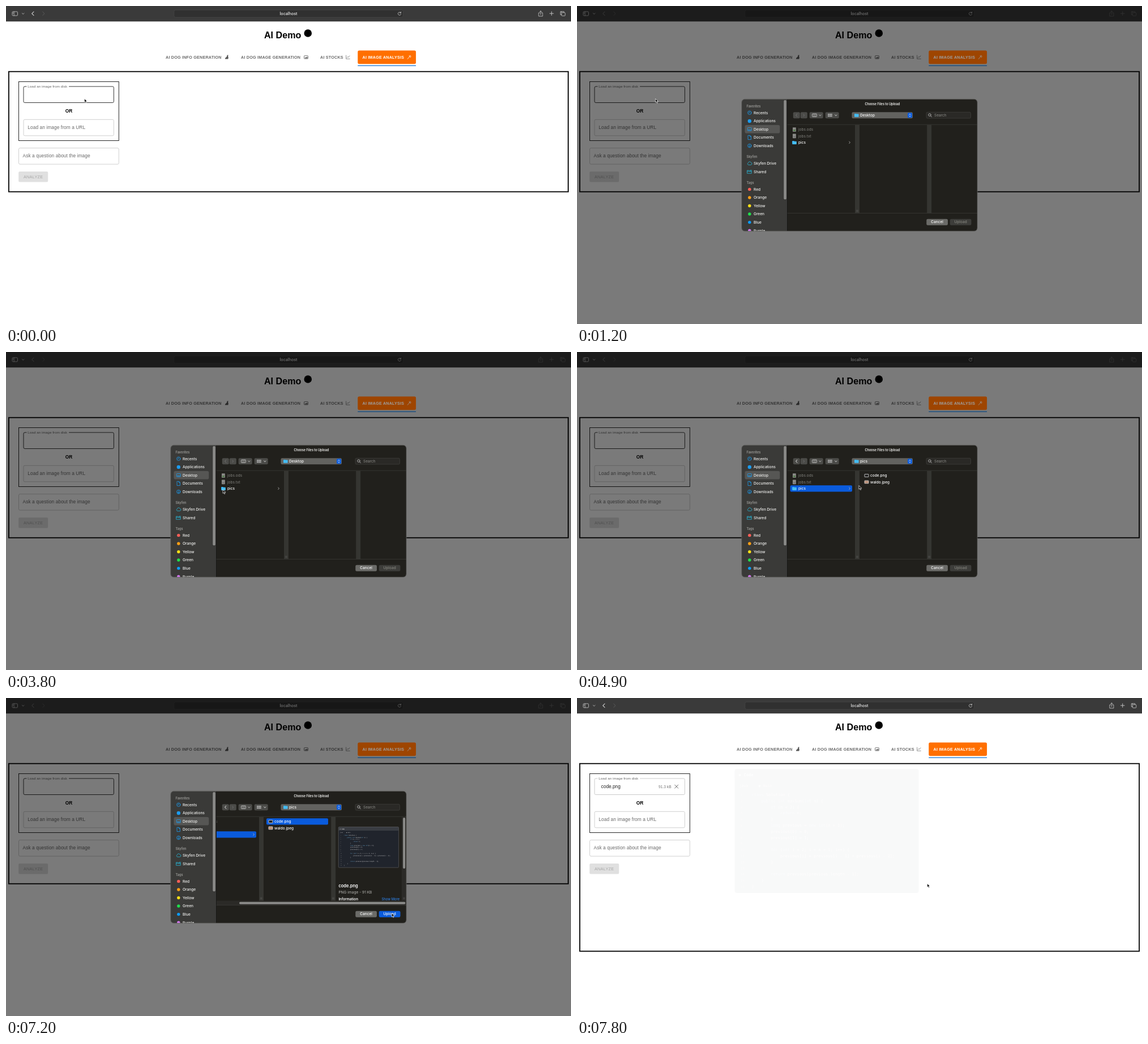
These frames come from a looping animation (998 px wide and 561 px high, 8 s). An HTML page:

```html
<!DOCTYPE html>
<html lang="en">
<head>
<meta charset="utf-8">
<title>AI Demo</title>
<style>
  html, body { margin: 0; width: 100%; height: 100%; overflow: hidden; background: #fff; }
  svg { display: block; width: 998px; height: 561px; }
  .page { font-family: "Liberation Sans", Arial, sans-serif; }
  .mac { font-family: Inter, sans-serif; }
  .mono { font-family: "DejaVu Sans Mono", monospace; }
  .line { fill: none; stroke-linecap: round; stroke-linejoin: round; }
  .accent { fill: var(--accent); }
</style>
</head>
<body>
<svg id="stage" viewBox="0 0 998 561"></svg>
<script>
const text = (x, y, size, str, fill = '#fff', more = '') =>
  `<text x="${x}" y="${y}" font-size="${size}" fill="${fill}" ${more}>${str}</text>`;
const box = (x, y, w, h, fill, r = 0, more = '') =>
  `<rect x="${x}" y="${y}" width="${w}" height="${h}" rx="${r}" fill="${fill}" ${more}/>`;
const line = (d, color, width = 0.8, more = '') =>
  `<path class="line" d="${d}" stroke="${color}" stroke-width="${width}" ${more}/>`;
const frame = (x, y, w, h, color, width = 0.8, r = 0, more = '') =>
  box(x, y, w, h, 'none', r, `stroke="${color}" stroke-width="${width}" ${more}`);
const dot = (x, y, r, fill) => `<circle cx="${x}" cy="${y}" r="${r}" fill="${fill}"/>`;
const mid = 'text-anchor="middle"', bold = 'font-weight="700"', semi = 'font-weight="600"';
const caps = bold + ' letter-spacing=".207"', label = 'letter-spacing=".078"';

const toolbar = () => box(0, 0, 998, 27.3, '#3a3a3a') +
  frame(11, 10, 9.5, 7, '#ccc', 0.8, 1.3) + line('M14.2 10V17M12.3 11.8h.7M12.3 13.3h.7', '#ccc', 0.7) +
  line('M28.4 12.7l1.8 1.7 1.8-1.7', '#bbb', 0.9) +
  box(296.8, 7, 404.6, 13, '#303030', 2.8, 'stroke="#4c4c4c" stroke-width=".6"') +
  text(499, 16.2, 7.1, 'localhost', '#f4f4f4', mid + ' font-weight="500"') +
  line('M697.4 12a2.7 2.7 0 1 0 .3 2.5M697.6 10.2v2.1h-2.1', '#ccc', 0.8) +
  line('M67.2 10.3l-3.2 3.1 3.2 3.1', '#5c5c5c', 1, 'transform="matrix(-1 0 0 1 132 0)"') +
  `<g id="nav">${line('M49 10.2l-3.3 3.2 3.3 3.2', '#d4d4d4', 1.1)}
  ${line('M942.6 12h-1.7v6h7v-6h-1.7M944.4 15.2V8.8M942.6 10.5l1.8-1.8 1.8 1.8', '#ccc')}
  ${line('M960.4 13.2h6.6M963.7 9.9v6.6', '#ccc', 0.9)}
  ${line('M981.2 11.6v-1.8h-1.9v5.6h1.9M981.2 9.8h4.4v1.8', '#ccc')}${frame(981.3, 11.6, 6.4, 5.8, '#ccc', 0.8, 1)}</g>`;

const field = (x, y, w, str, tx, ty) => frame(x, y, w, 28.5, '#c4c4c4', 0.8, 2.2) + text(tx, ty, 8.34, str, '#6a6a6a', label);

const page = () => text(456, 57, 16.1, 'AI Demo', '#000', bold) + dot(533.3, 48, 6.8, '#000') +
  text(282, 93.2, 7.2, 'AI DOG INFO GENERATION', '#6a6a6a', caps) +
  '<path d="M391.4 86.2l1.3.6-.6 1.5q1 2 .3 5.1h-5.5q-.2-1.8 1.9-2.8 1.7-1.4 1.5-3.2z" fill="#555"/>' +
  text(415, 93.2, 7.2, 'AI DOG IMAGE GENERATION', '#6a6a6a', caps) +
  frame(526.6, 87.7, 6.8, 5.3, '#555', 0.8, 0.6) + '<path d="M527.5 92.2l1.6-2 1 1 1.5-2 1.3 3z" fill="#555"/>' +
  text(555, 93.2, 7.2, 'AI STOCKS', '#6a6a6a', caps) +
  line('M600.7 87v6.3h6.6M602 91.4l1.8-2 1.2 1 2-2.5', '#666', 0.7) +
  frame(4.9, 115.7, 988.2, 212, '#000', 1.8, 0, 'id="panel"') +
  frame(22.5, 133.5, 176.8, 104, '#111', 0.9) +
  line('M36 142h-2.8a2.2 2.2 0 0 0-2.2 2.2v24.1a2.2 2.2 0 0 0 2.2 2.2h155a2.2 2.2 0 0 0 2.2-2.2v-24.1a2.2 2.2 0 0 0-2.2-2.2h-76.7', '#222', 0.9, 'id="disk"') +
  text(38.3, 143.9, 6.26, 'Load an image from disk', '#666', 'letter-spacing=".06"') +
  text(111, 188, 8.34, 'OR', '#000', bold + mid) +
  field(31, 200.3, 159.4, 'Load an image from a URL', 38.3, 217) +
  field(22.5, 250.6, 176.8, 'Ask a question about the image', 29.6, 267.4) +
  box(22.2, 292, 52, 18.6, '#e0e0e0', 2.2) +
  text(48.2, 304, 7.3, 'ANALYZE', '#a6a6a6', 'letter-spacing=".25" ' + mid) +
  `<g id="loaded">${text(42.6, 159, 8.34, 'code.png', '#222')}${text(144, 158.6, 6.7, '91.3 kB', '#777')}
  ${line('M172.7 153.2l6 6M178.7 153.2l-6 6', '#444', 0.8)}</g>
  <use id="preview" href="#snippet" x="278.6" y="125" opacity=".023"/>`;

const activeTab = () => `<g id="tab" class="page">${box(621.3, 78.5, 102.8, 23.7, '#ff6f00', 2.6)}
  ${text(629.6, 93.2, 7.2, 'AI IMAGE ANALYSIS', '#fff', caps)}
  ${line('M709.3 93.4l3.6-4', '#fff', 0.8)}${line('M712 88l2.6 2.5M713.3 87.2l2 1.7', '#fff', 1)}
  ${box(621.3, 104.6, 102.8, 1.3, '#1976d2')}</g>`;

const source = `class Solution {
    public int maxSum(int n) {
        if (n &lt; 2) {
            return n;
        }
        long previous = new int[n + 1];
        previous[0] = 0;
        previous[1] = 1;

        for (int i = 2; i &lt; n + 1; i++) {
            previous[i] = previous[i - 1] + previous[i - 2];
        }

        return previous[previous.length - 1];
    }
}`.split('\n');

const snippet = () => `<g id="snippet" class="mono">${box(0, 0, 325, 219, '#20242c', 4)}${box(0, 0, 325, 20, '#393c42', 4)}` +
  dot(9, 11, 2, '#ddd') + text(16, 13, 7, 'Code', '#eee', bold) + text(8, 32, 6.5, 'java', '#ccc') + text(42, 32, 6.5, '● main', '#ccc') +
  source.map((row, i) => {
    const code = row.trim(), indent = row.length - row.trimStart().length, y = 48 + i * 10.8;
    return text(10, y, 6, i + 1, '#777') + text(30 + indent * 4.2, y, 7,
      code.replace(/\b(class|public|int|if|return|long|new|for)\b/g, '<tspan fill="#6fb3e0">$1</tspan>'), '#e4e4e4');
  }).join('') + '</g>';

const folder = (x, y) => box(x, y - 2.9, 3.6, 3, '#2aa5e8', 0.7) + box(x, y - 2.2, 7.6, 5.2, '#45bdf5', 0.7);
const sheet = (x, y, tint) => box(x, y - 3.8, 5.8, 7.6, '#8b8b88', 0.6) + box(x + 1.2, y, 3.3, 2.6, tint);
const image = (x, y, fill) => box(x, y - 2.4, 7, 4.8, fill, 0.3, 'stroke="#ddd" stroke-width=".8"');
const chevron = (x, y, color) => line(`M${x} ${y - 1.8}l1.5 1.8-1.5 1.8`, color, 0.8);
const grip = (x, y) => line(`M${x - 1} ${y - 1.5}v3M${x + 1} ${y - 1.5}v3`, '#777', 0.5);

const skyBlue = '#1b9cf0', teal = '#27b8d8';
const icons = {
  Recents: dotRing(304.8, 188.3) + line('M304.8 186.2v2.3h-1.6', skyBlue, 0.7),
  Applications: dot(304.8, 203, 3.2, skyBlue),
  Desktop: frame(301.3, 214.6, 7, 5.6, skyBlue, 0.8, 0.9) + line('M302.6 218.6h4.4', skyBlue, 1),
  Documents: line('M302.4 228.3h3.2l1.8 1.8v5.5h-5zM305.4 228.5v1.8h1.8', skyBlue, 0.8),
  Downloads: dotRing(304.8, 246.5) + line('M304.8 244.5v3.8M303.3 247l1.5 1.5 1.5-1.5', skyBlue, 0.7),
  'Skyfen Drive': line('M302.5 280.2a1.8 1.8 0 0 1 0-3.4a2.5 2.5 0 0 1 4.8-.5a2 2 0 0 1 .2 3.9z', teal, 0.8),
  Shared: line('M301 290h2.4l.8 1h4v4.3H301zM301 291.8h7M306 289.8h2.4', teal, 0.8)
};
function dotRing(x, y) { return `<circle class="line" cx="${x}" cy="${y}" r="3.2" stroke="${skyBlue}" stroke-width=".8"/>`; }

const sidebar = () => {
  const row = (str, y) => text(312, y + 2.4, 6.55, str, '#f2f2f0', 'font-weight="500"');
  const head = (str, y) => text(299.5, y + 2.1, 5.6, str, '#9b9b98', semi);
  const at = { Recents: 188.3, Applications: 203, Desktop: 217.4, Documents: 232, Downloads: 246.5, 'Skyfen Drive': 277.7, Shared: 292.2 };
  const tags = { Red: '#ff5f57', Orange: '#ffa014', Yellow: '#ffe016', Green: '#1fe04c', Blue: '#0a9dff', Purple: '#d879f5' };
  return box(291, 164, 80.5, 234, '#3a3a38') + box(296.5, 210, 61.8, 14.6, '#565654', 2.8) +
    box(365.3, 166, 4.5, 175.2, '#8b8b89', 2) + head('Favorites', 176.6) + head('Skyfen', 266.3) + head('Tags', 312) +
    Object.keys(at).map(name => icons[name] + row(name, at[name])).join('') +
    Object.keys(tags).map((name, i) => dot(304.8, 323.4 + i * 14.55, 2.7, tags[name]) + row(name, 323.4 + i * 14.55)).join('');
};

const columns = () => `<g clip-path="url(#list)"><g id="cols">
  ${box(491, 209.5, 8, 156, '#353531')}${box(618.2, 209.5, 8, 156, '#353531')}
  ${box(376.6, 235.2, 109.4, 11.4, '', 2, 'class="accent" id="pickDir"')}
  ${sheet(381, 218, '#4c7a45')}${text(391, 220.2, 6.5, 'jobs.ods', '#82827e')}
  ${sheet(381, 229.4, '#777')}${text(391, 231.7, 6.5, 'jobs.txt', '#82827e')}
  ${folder(380.2, 241)}${text(391, 243.2, 6.5, 'pics', '#fff', 'font-weight="500"')}${chevron(480.8, 240.8, '#bbb')}
  <g id="files">${box(504, 212.2, 109, 11.4, '', 2, 'class="accent" id="pickFile"')}
  ${image(508, 218, '#222')}${text(518, 220.2, 6.5, 'code.png', '#fff', 'font-weight="500"')}
  ${image(508, 229.4, '#b98d74')}${text(518, 231.7, 6.5, 'waldo.jpeg', '#fff', 'font-weight="500"')}</g>
  <g id="details"><use href="#snippet" transform="translate(631.3 227.5) scale(.327)"/>
  ${frame(631.3, 227.5, 106.3, 71.6, '#666', 0.6, 1.3)}
  ${text(631.4, 334, 7.5, 'code.png', '#fff', semi)}${text(631.4, 344.7, 6.6, 'PNG image - 91 KB', '#b4b4b0')}
  ${text(631.4, 356.8, 6.2, 'Information', '#fff', semi)}${text(707.5, 356.8, 5.9, 'Show More', '#2f8cff')}</g></g>
  <g id="bars">${box(372, 357.6, 335, 8, '#2b2a27')}${box(412, 359.7, 293.5, 4, '#8b8b89', 2)}
  ${box(699, 209.5, 8, 148, '#2b2a27')}${box(701.2, 211, 4, 90, '#8b8b89', 2)}${grip(450.8, 353.5)}${grip(578, 353.5)}${grip(703, 353.5)}</g>
  <g id="grips">${grip(495, 361.5)}<g id="grip2">${grip(622.2, 361.5)}</g></g></g>`;

const dialog = () => `<g id="dialog" class="mac"><g clip-path="url(#window)">
  ${box(291, 164, 416, 234, '#21201c')}${sidebar()}${box(371.3, 164, 0.7, 234, '#111')}
  ${text(539.3, 175.1, 5.55, 'Choose Files to Upload', '#f4f4f2', semi + mid)}
  ${box(381.8, 187.2, 12, 11, '#4b4b48', 2)}${box(394.8, 187.2, 12, 11, '#4b4b48', 2)}
  ${line('M388.8 190.3l-2.2 2.4 2.2 2.4', '#fff', 0.9, 'id="back"')}${chevron(400, 192.7, '#777')}
  ${box(410.7, 187.2, 24, 11, '#4b4b48', 2)}${frame(415.5, 190.2, 8, 5, '#ddd', 0.7, 0.5)}${line('M418.2 190.2v5M420.9 190.2v5', '#ddd', 0.6)}
  ${line('M427.6 192l1.7 1.7 1.7-1.7M455.6 192l1.7 1.7 1.7-1.7', '#ddd', 0.8)}
  ${box(438.7, 187.2, 24, 11, '#4b4b48', 2, 'style="mix-blend-mode:lighten"')}
  ${[0, 1].map(r => [0, 1, 2].map(c => box(443.2 + c * 2.7, 190.2 + r * 2.9, 2, 2, '#ccc')).join('')).join('')}
  ${line('M455.6 192l1.7 1.7 1.7-1.7', '#ddd', 0.8)}
  ${box(485.5, 187.2, 107.5, 11, '#62625f', 2.2)}${folder(490, 192.8)}${text(500, 195.1, 6.55, 'Desktop', '#fff', 'id="where" font-weight="500"')}
  ${box(584, 188.2, 8, 9, '', 1.8, 'class="accent"')}${line('M586.6 191.8l1.4-1.5 1.4 1.5M586.6 193.7l1.4 1.5 1.4-1.5', '#fff', 0.8)}
  ${box(617, 187.3, 78.5, 10.8, '#2a2926', 2, 'stroke="#454542" stroke-width=".6"')}
  ${line('M625.2 192.1a2.2 2.2 0 1 0-4.4 0a2.2 2.2 0 1 0 4.4 0M624.6 193.8l1.9 1.9', '#ccc', 0.8)}
  ${text(631, 195.2, 6.5, 'Search', '#8f8f8b')}
  ${columns()}${line('M372 209.2H707M372 365.5H707', '#3d3d3a', 0.7)}
  ${box(617.3, 375.8, 37.7, 10.9, '#6b6b68', 2.3)}${text(636.1, 383.4, 6.5, 'Cancel', '#fff', mid + 'font-weight="500"')}
  ${box(658.8, 375.8, 37.7, 10.9, '#3d3d3a', 2.3)}${box(658.8, 375.8, 37.7, 10.9, '', 2.3, 'class="accent" id="ready"')}
  ${text(677.6, 383.4, 6.5, 'Upload', '#85857f', mid + 'id="upload" font-weight="500"')}</g>
  ${frame(290.8, 164.2, 416.4, 233, '#5e5e5c', 0.8, 5.5)}</g>`;

document.getElementById('stage').innerHTML = `<defs>${snippet()}
  <clipPath id="window">${box(291, 164.4, 416, 232.6, '#000', 5.5)}</clipPath>
  <clipPath id="list">${box(372, 209.5, 335, 156, '#000')}</clipPath></defs>
  ${box(0, 0, 998, 561, '#fff')}<g class="page">${page()}</g><g class="mac">${toolbar()}</g>
  ${box(0, 0, 998, 561, '#000', 0, 'id="shade"')}${activeTab()}${dialog()}
  <path id="cursor" d="M0 0V6.5L1.5 5.1 2.6 7.7 3.8 7.2 2.7 4.7H4.7Z" fill="#000" stroke="#fff" stroke-width=".7"/>`;

const el = id => document.getElementById(id);
const set = (id, attrs) => { for (const key in attrs) el(id).setAttribute(key, attrs[key]); };
const show = (id, on) => set(id, { visibility: on ? 'visible' : 'hidden' });
const clamp = v => Math.min(1, Math.max(0, v));
const ease = v => v * v * (3 - 2 * v);

// Pointer stops: time, x, y
const stops = [[0, 138.6, 163.6], [1200, 138.6, 163.6], [1800, 308, 220], [2600, 341, 232], [2800, 340.8, 231.6], [3000, 340.8, 231.6],
  [3400, 376, 242.4], [3500, 376, 242.4], [4000, 387, 243], [4500, 387, 243], [4900, 498, 235.6], [5100, 541, 217],
  [5900, 541, 217], [6500, 685, 373], [6800, 681.3, 379.6], [7450, 681.3, 379.6], [7800, 618.7, 327.4], [8000, 618.7, 327.4]];
function pointer(t) {
  const i = stops.findIndex(s => s[0] > t), [t0, x0, y0] = stops[i - 1], [t1, x1, y1] = stops[i];
  const p = ease((t - t0) / (t1 - t0));
  return `translate(${x0 + (x1 - x0) * p} ${y0 + (y1 - y0) * p})`;
}

function draw(now) {
  const t = Math.floor(now % 8000 / 100) * 100;
  const opening = t < 4000;
  const k = opening ? clamp((t - 940) / 190) : clamp(1 - (t - 7210) / 270);
  const dim = opening ? k ** 1.5 : k;
  const inPics = t >= 3900, picked = t >= 5700, scrolled = ease(clamp((t - 5700) / 400));

  set('shade', { opacity: 0.52 * dim });
  el('tab').style.filter = `brightness(${1 - 0.38 * dim})`;
  set('nav', { opacity: k > 0 ? 0.3 : 1 });
  set('dialog', { opacity: k, transform: `translate(0 ${(opening ? -22.8 : -18.6) * (1 - k)})` });
  el('dialog').style.setProperty('--accent', k < 1 ? '#666664' : '#0a5bdc');

  for (const id of ['pickDir', 'files', 'grip2']) show(id, inPics);
  for (const id of ['details', 'ready']) show(id, picked);
  show('pickFile', picked);
  show('bars', scrolled === 1);
  show('grips', !picked);
  show('grip2', inPics && !picked);
  set('cols', { transform: `translate(${-44 * scrolled} 0)` });
  set('back', { stroke: inPics ? '#fff' : '#777' });
  set('upload', { fill: picked ? '#fff' : '#85857f' });
  el('where').textContent = inPics ? 'pics' : 'Desktop';

  const loaded = t >= 7600, shown = t >= 7800;
  show('loaded', loaded);
  set('disk', { stroke: loaded ? '#c4c4c4' : '#222' });
  show('preview', shown);
  set('panel', { height: shown ? 331 : 212 });
  set('cursor', { transform: pointer(t) });
}

const start = performance.now();
(function tick() {
  draw(performance.now() - start);
  requestAnimationFrame(tick);
})();
</script>
</body>
</html>
```
